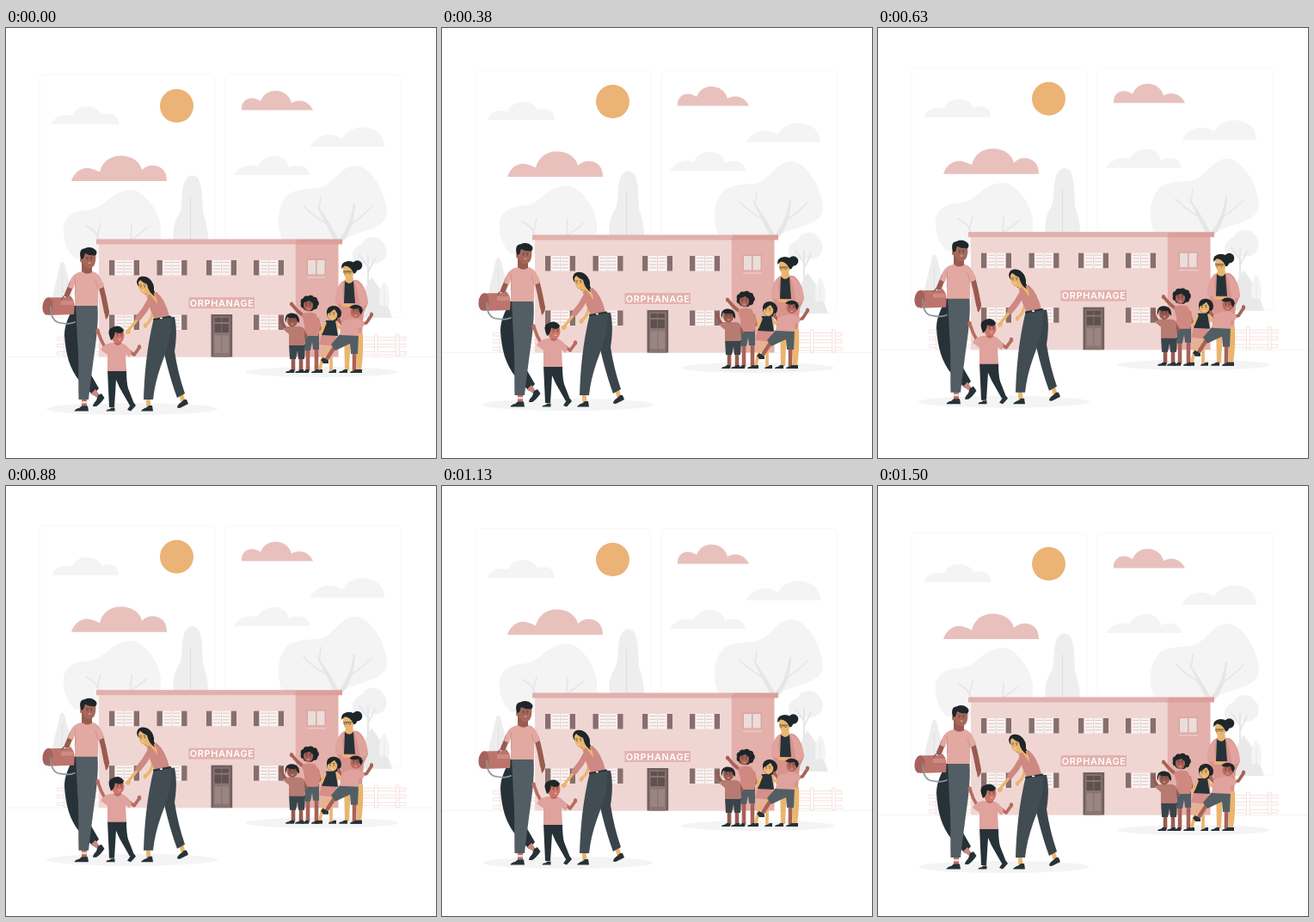
An HTML page with a canvas for the animation above (1540 ms loop, 500x500 px).

```html
<!DOCTYPE html>
<html lang="en">
<head>
<meta charset="utf-8">
<style>
html, body { margin: 0; width: 100%; height: 100%; overflow: hidden; background: #fff; }
canvas { display: block; width: 100vw; height: 100vh; }
</style>
</head>
<body>
<canvas id="stage"></canvas>
<script>
const canvas = document.getElementById('stage');
const ctx = canvas.getContext('2d');
const LOOP = 1540, STEP = 1000 / 24, HALF = 18, LIFT = 10;

const INK = '#263238', HAIR = '#1f2629', SLATE = '#525e63', PINK = '#dfa29c';
const ROSE = '#e8c1bd', PALE = '#f4f4f4', GREY = '#e6e6e6', TAN = '#eab56f';
const DARK = '#995b4f', BROWN = '#b96b60', RUST = '#a86256', SHUTTER = '#866f6d';

const paths = new Map();
function shape(d) {
  if (!paths.has(d)) paths.set(d, new Path2D(d));
  return paths.get(d);
}
function fill(color, d) {
  ctx.fillStyle = color;
  ctx.fill(shape(d));
}
function line(color, width, d) {
  ctx.strokeStyle = color;
  ctx.lineWidth = width;
  ctx.stroke(shape(d));
}
function oval(color, x, y, rx, ry = rx, turn = 0) {
  ctx.fillStyle = color;
  ctx.beginPath();
  ctx.ellipse(x, y, rx, ry, turn, 0, 7);
  ctx.fill();
}
function box(color, x, y, w, h) {
  ctx.fillStyle = color;
  ctx.fillRect(x, y, w, h);
}
function face(x, y) {
  oval(INK, x - 2.2, y - 1, .5, .8);
  oval(INK, x + 2.2, y - 1, .5, .8);
  line(INK, .6, `M${x - 3.3} ${y - 3}h2M${x + 1.2} ${y - 3}h2`);
  line('#f6e2de', .7, `M${x - 1} ${y + 3.2}q1 1 2.200 0`);
}
function shoe(x, y, w = 10) {
  fill(INK, `M${x} ${y}q0 -2 4 -2.3l2 -1.7h${w - 6}v4z`);
}

function sky() {
  ctx.strokeStyle = '#f8f8f8';
  ctx.lineWidth = 1;
  for (const x of [39, 255]) {
    ctx.beginPath();
    ctx.roundRect(x, 54.3, 204, 282, 4);
    ctx.stroke();
  }
  oval('#ebb376', 198.5, 90.6, 19.5);
  fill(ROSE, 'M76 178C80 166 90 161 99 163.5Q105 165 109 167.5C112 155 122 148.5 133 148.5C146 148.5 156 155 158 165C163 160 170 158.5 176 160.5C184 163 187 170 187 178Z');
  fill(ROSE, 'M274 95.5C273 87 279 81 287 81.5Q292 82 296 85C299 77 306 73 313 73C323 73 330 79 332 87C342 81 353 86 357 95.5Z');
  fill(PALE, 'M53 112C57 102 67 99 77 102.5C79 95 86 91 94 91C103 91 109 95 111 101C121 97 131 100 131 112Z');
  fill(PALE, 'M354 138C359 126 374 121 385 126Q389 127 391 128.5C395 120 405 115 416 115.5C430 116 440 125 440 138Z');
  fill(PALE, 'M265 171C271 161 283 157 292 161C296 153 304 149 312 149C321 149 327 154 329 162C340 157 352 160 353 171Z');
}

function trees() {
  fill(PALE, 'M80 268Q67 255 67 238C65 220 78 213 92 212C104 211 108 208 116 202C126 192 140 186 151 189C164 195 178 213 180 232Q181 246 175 268Z');
  line(GREY, 1.6, 'M145 248L146 228M145 246Q155 241 164 232M109 248Q106 236 93 230M106 243L110 227');
  fill('#eeeeee', 'M195 246C193 235 196 224 202 215C206 206 203 188 208 178Q214 167 223 174C229 184 228 199 229 215Q235 232 235 246Z');
  line('#dedede', 1, 'M214.500 246V196');
  fill(PALE, 'M321 246C314 227 316 208 325 197C332 187 350 187 364 186C376 183 384 172 391 166C398 160 408 158 416 163C428 171 441 190 443 214C443 227 430 232 418 236C405 240 395 244 390 248Z');
  fill(GREY, 'M382 248Q372 229 360 203Q376 225 387 246Q401 229 404 204H406Q405 232 392 248Z');
  line(GREY, 1.6, 'M364 212L366 196M372 227Q356 218 346 207M398 230Q414 220 425 208');

  fill('#f2f2f2', 'M404 270C400 261 406 254 414 251C417 242 432 240 437 248C445 255 444 268 437 271C431 276 425 272 418 274Q409 276 404 270Z');
  line(GREY, 2, 'M421 338V264M421 284L429 268M421 278L411 264');
  fill('#e9e9e9', 'M409 337Q414 304 425 290Q439 306 449 337Z');
  fill(PALE, 'M434 319C433 305 438 295 440 295C444 299 448 313 445 323H435Z');
  line(GREY, .8, 'M440 337V304');
  fill('#ededed', 'M54 317C55 302 60 291 62 278Q65 266 69 277C72 292 78 306 77 317Z');
  line('#dedede', .8, 'M65.500 317V286');
}

function fence(x, w, posts) {
  ctx.strokeStyle = '#f2cfcb';
  ctx.lineWidth = .6;
  for (const y of [359.5, 367.5, 376.5]) ctx.strokeRect(x, y, w, 3.5);
  for (const post of posts) {
    box('#fff', post, 356, 3, 26);
    ctx.strokeRect(post, 356, 3, 26);
  }
}

function shutterWindow(x, y) {
  box(SHUTTER, x, y, 6.3, 17.5);
  box(SHUTTER, x + 28.7, y, 6.3, 17.5);
  box('#fbf4f2', x + 6.8, y, 21.4, 17.5);
  for (let i = 0; i < 4; i++) {
    box('#d8c8c5', x + 8.2, y + 2 + i * 3.8, 8.2, 1);
    box('#d8c8c5', x + 18.5, y + 2 + i * 3.8, 8.2, 1);
  }
  line('#dccac7', .7, `M${x + 17.5} ${y}v17.500`);
}

function building() {
  box('#f0d6d3', 108, 250, 228.5, 132.5);
  box('#e3b0ac', 336.5, 250, 50, 132.5);
  box('#e2b0ac', 105, 245.5, 235, 6);
  fill('#dc9f9a', 'M339 245.500H391V251.500H336Z');
  for (const x of [120, 175.5, 233, 288]) shutterWindow(x, 270);
  for (const x of [120, 175.5, 288]) shutterWindow(x, 333.5);
  box('#d9a6a1', 349.5, 268.5, 22.5, 19);
  box('#eaddda', 351, 270, 9, 16.5);
  box('#eaddda', 361.5, 270, 9, 16.5);
  box('#edcfcc', 350, 289.5, 22, 1.2);

  box('#715f5e', 238.5, 333, 24.7, 49.5);
  box('#897472', 241, 335.5, 19.5, 47);
  box('#5f5150', 242.5, 337, 16.5, 5);
  box('#5f5150', 242.5, 344, 16.5, 10);
  line('#897472', .8, 'M250.700 337V354');
  box('#9b8583', 242.5, 357.5, 7.6, 20.5);
  box('#9b8583', 251.5, 357.5, 7.6, 20.5);

  box('#e4b3ae', 212.5, 313, 76.5, 13);
  ctx.fillStyle = '#fff';
  ctx.font = '600 10.9px Inter, sans-serif';
  ctx.letterSpacing = '0.6px';
  ctx.textAlign = 'center';
  ctx.fillText('ORPHANAGE', 251.1, 323.6);
}

function father() {
  fill(INK, 'M80 322C73 335 68 345 68 357C69 378 74 397 86 411L101 427L108 419L97 400V323Z');
  fill('#c98780', 'M99 425L104 420L109 427L106 430Z');
  fill(INK, 'M101 440Q101 437 105 433L107 427L111 425L114.500 430Q110 437 105 440Z');
  fill(BROWN, 'M88 428H94V442H88Z');
  box('#f3dcd9', 87.5, 434, 7, 2.5);
  fill(SLATE, 'M81 322H106.500C108 346 104 368 101 391Q98 414 96 432H84.500C84 410 85 387 83 363Z');
  fill(INK, 'M79.500 445.500Q80 443 85 442L88 439.500H95L96 445.500Z');

  fill('#bd746d', 'M49 313.500L76 313Q81 317 79 333L49 334Z');
  fill('#cf8a82', 'M64 317H78V322H64Z');
  oval('#a5625c', 48.5, 323.5, 6, 10.2, .12);
  line('#8a9699', 1.7, 'M52 324Q52 342 64 343Q73 345 80 342');
  line('#8e5049', 1.2, 'M65 315Q69 307 75 313');

  line(DARK, 6, 'M77 296Q74 303 71 310');
  line(DARK, 6, 'M110 298Q114 313 117 330');
  fill(DARK, 'M114 328L119.500 328Q121 335 116 339Z');
  fill('#e2a9a2', 'M74 297C75 288 82 284 89 283H100C107 284 111 290 114 301L107.500 304L107 323H80L80 298L78 304L72 301Z');
  line('#cb8981', .7, 'M80 291Q82 305 80 310M107 303L104 293');
  fill(DARK, 'M88 272H100L100 284Q94 288 88 283Z');
  fill('#a6685a', 'M87 261Q96 256 104 262Q106 279 96 279.500Q88 277 87 261Z');
  oval('#a6685a', 88, 270, 2, 2.7);
  fill(HAIR, 'M87 269Q84 257 91 256.500Q99 253 104 258Q107 261 104 264.500Q97 265 92 262L90 268Z');
  face(97, 270);
}

function mother() {
  line(TAN, 5, 'M165 429L166 441M203 424L206 434');
  fill('#39454a', 'M178 336L196 336C199 350 198 364 196 376Q200 402 208 425L199 430C190 405 184 381 180 358Z');
  fill('#414d52', 'M172 337L192 336C194 354 187 375 180 393Q173 413 171 432H160C161 405 163 374 172 337Z');
  fill(INK, 'M157 445.500Q158 443 164 441L166 439H170L171 445.500Z');
  fill(INK, 'M199 441.500Q199 438 204 435L207 432L210 432L212 437L202 442Z');
  line(TAN, 3.5, 'M171 326Q171 338 163 345');
  oval(TAN, 162, 346, 2.2, 2.8);
  fill(HAIR, 'M153 299C150 290 158 286 166 291Q173 297 172 305L176 314Q169 316 161 309Z');
  fill(TAN, 'M161 304H169L172 312L165 318Z');
  fill('#ce8982', 'M164 311L175 307Q185 315 190 335L173 339L168 328Z');
  line(TAN, 3.5, 'M155 336L143 351');
  oval(TAN, 142, 353, 2.7, 3.2, .6);
  line('#ce8982', 7, 'M167 318Q162 328 154 337');
  fill(TAN, 'M167 309L172 308Q176 314 176 321Z');
  line(INK, 2.2, 'M172 339L191 335.500');
  box('#fff', 179, 336.7, 3, 1.5);
  fill(TAN, 'M154 296Q156 290 163 292L167 300Q167 309 161 309.500Q154 308 154 296Z');
  fill(HAIR, 'M152 297Q153 288 162 289.500Q169 291 171 299Q170 305 173 312Q166 308 164 298Q159 296 156 293Z');
  face(159, 302);
}

function child() {
  line(BROWN, 3.7, 'M115 371Q110 363 107 353');
  oval(BROWN, 106.5, 352, 2.2, 2.8);
  line(BROWN, 3.7, 'M141 374L149 380L154 373');
  oval(BROWN, 155, 371, 2.2, 2.8);
  fill(INK, 'M118 397H140Q140 412 142 419L149 437L144 439L132 418L128 409L126 441H120Z');
  shoe(116.5, 445.5);
  fill(INK, 'M141 444L145 438L149 436L151 439L145 445.500Z');
  fill(PINK, 'M112 371Q117 366 125 366H133Q140 367 146 377L144 383L139 379L140 399H118V380L110 374Z');
  fill(BROWN, 'M125 361H134V367Q130 371 126 367Z');
  oval('#cf766a', 130, 358, 7.5, 8.7);
  fill(HAIR, 'M122 363Q117 351 122 349Q131 343 137 351L136 354Q130 356 127 353.500Q126 361 122 363Z');
  face(132, 359);
}

function caretaker() {
  fill(TAN, 'M393 355H401L399 398H394ZM406 355H415Q416 380 413 397H408Z');
  shoe(387, 401, 10);
  shoe(401, 401, 13);
  fill('#d8938d', 'M384 319C382 306 388 295 395 293H407C414 294 420 306 421 320L416 331L414 355H390L389 330Z');
  fill(INK, 'M394 294H404L406 320H393Z');
  fill('#e0a39d', 'M394 293C390 300 391 309 393 321L383 320Q383 298 394 293ZM404 293C409 301 410 315 412 325L421 321Q419 298 404 293Z');
  line(TAN, 3, 'M392 322L404 323');
  fill(TAN, 'M396 286H403L404 294Q399 300 394 294Z');
  oval(HAIR, 408.5, 276, 5.8);
  fill(TAN, 'M392 277Q402 272 405 281Q404 292 398 293Q391 289 392 277Z');
  fill(HAIR, 'M390 280Q389 272 398 271Q407 271 409 279Q407 287 404 285Q401 277 394 276.500Z');
  line(INK, .6, 'M393 283H401M393 283a1.700 1.700 0 1 0 3 0M398 283a1.700 1.700 0 1 0 3 0');
}

function firstBoy() {
  line(DARK, 3.7, 'M328 351Q323 348 320 339M344 350L349 359');
  oval(DARK, 320, 338, 2.1, 2.6);
  line(DARK, 4.6, 'M334 382V398M343 382V398');
  shoe(325, 401);
  shoe(336, 401);
  fill('#39454a', 'M329 368H348L347 385H340L339 375L337 385H330Z');
  fill('#b77b71', 'M326 347H342Q348 349 347 357V369H329V356L323 351Z');
  oval(DARK, 333, 340, 6.2, 7.5);
  fill(HAIR, 'M325 343Q323 332 332 331.500Q342 332 341 343Q338 341 337 337Q330 338 327 336Z');
  face(333, 341);
}

function curlyKid() {
  line(RUST, 3.7, 'M347 335Q340 331 333 322M362 339L365 350L355 354');
  oval(RUST, 332, 321, 2.2, 2.6);
  line(RUST, 4.6, 'M351 370V398M361 368V398');
  shoe(343, 401, 9);
  shoe(355, 401, 9);
  fill(SLATE, 'M347 355H364V374H357L356 365L354 375H348Z');
  fill('#cf8981', 'M344 333Q350 329 360 332L366 345L363 358H347V345Z');
  for (let i = 0; i < 9; i++) {
    const a = i * Math.PI / 4.5;
    oval(HAIR, 353 + 7 * Math.cos(a), 320 + 5.5 * Math.sin(a), 3.8);
  }
  oval(RUST, 351.5, 322.5, 5.5, 7);
  fill(HAIR, 'M345 319Q346 312 354 313L361 321Q355 320 353 317Q349 319 345 319Z');
  face(351.5, 323);
}

function girl() {
  line(TAN, 3.7, 'M371 373L365 396M378 371V398M385 345L391 351');
  shoe(359, 401, 9);
  shoe(375, 401, 9);
  oval(HAIR, 381.5, 332, 8.5, 9);
  fill('#d58f88', 'M367 356H384L383 370L364 368Z');
  fill(INK, 'M372 340H383L386 358L367 357Z');
  line(TAN, 3.4, 'M371 343L367 353');
  oval(TAN, 379.5, 333, 5.8, 7.2);
  fill(HAIR, 'M373 333Q372 323 381 323Q389 324 389 336Q384 331 382 327Q378 330 373 333Z');
  face(379, 334);
}

function runner() {
  line(RUST, 3.7, 'M393 348L387 340M410 344L419 343L425 334');
  oval(RUST, 387, 339, 2.1, 2.4);
  oval(RUST, 425, 333, 2.1, 2.6);
  line(RUST, 4.6, 'M405 374V398M382 371L373 385');
  shoe(400, 401, 14);
  fill(INK, 'M366 386L369 383L375 387L375 390L369 390Z');
  fill(SLATE, 'M389 355L410 356L409 379H401L400 367L383 375L378 368Z');
  fill(PINK, 'M390 342Q397 338 408 338L417 342L416 347L410 349V358L388 357Z');
  oval('#b9685d', 407, 330, 6.5, 7.2);
  fill(HAIR, 'M399 325Q405 319 413 324L415 328L413 333Q410 330 410 326Q404 328 399 325Z');
  face(406.5, 331);
}

function drawScene() {
  sky();
  trees();
  line('#eeeeee', .7, 'M0 382.500H500');
  fence(60, 48, [68, 99]);
  fence(414, 51, [429, 454]);
  building();
  oval(PALE, 367, 400, 89, 6);
  oval(PALE, 146.5, 443, 99.5, 7);
  [caretaker, curlyKid, firstBoy, girl, runner, father, mother, child].forEach(draw => draw());
}

function frame(now) {
  const scale = devicePixelRatio || 1;
  const w = Math.round(innerWidth * scale), h = Math.round(innerHeight * scale);
  if (canvas.width !== w || canvas.height !== h) {
    canvas.width = w;
    canvas.height = h;
  }
  const step = Math.floor((now % LOOP + 5) / STEP) % (2 * HALF + 1);
  const lift = LIFT * (1 - Math.abs(step - HALF) / HALF);
  ctx.setTransform(1, 0, 0, 1, 0, 0);
  ctx.clearRect(0, 0, w, h);
  ctx.setTransform(w / 500, 0, 0, h / 500, 0, -lift * h / 500);
  ctx.lineCap = 'round';
  ctx.lineJoin = 'round';
  drawScene();
  requestAnimationFrame(frame);
}
requestAnimationFrame(frame);
</script>
</body>
</html>
```
